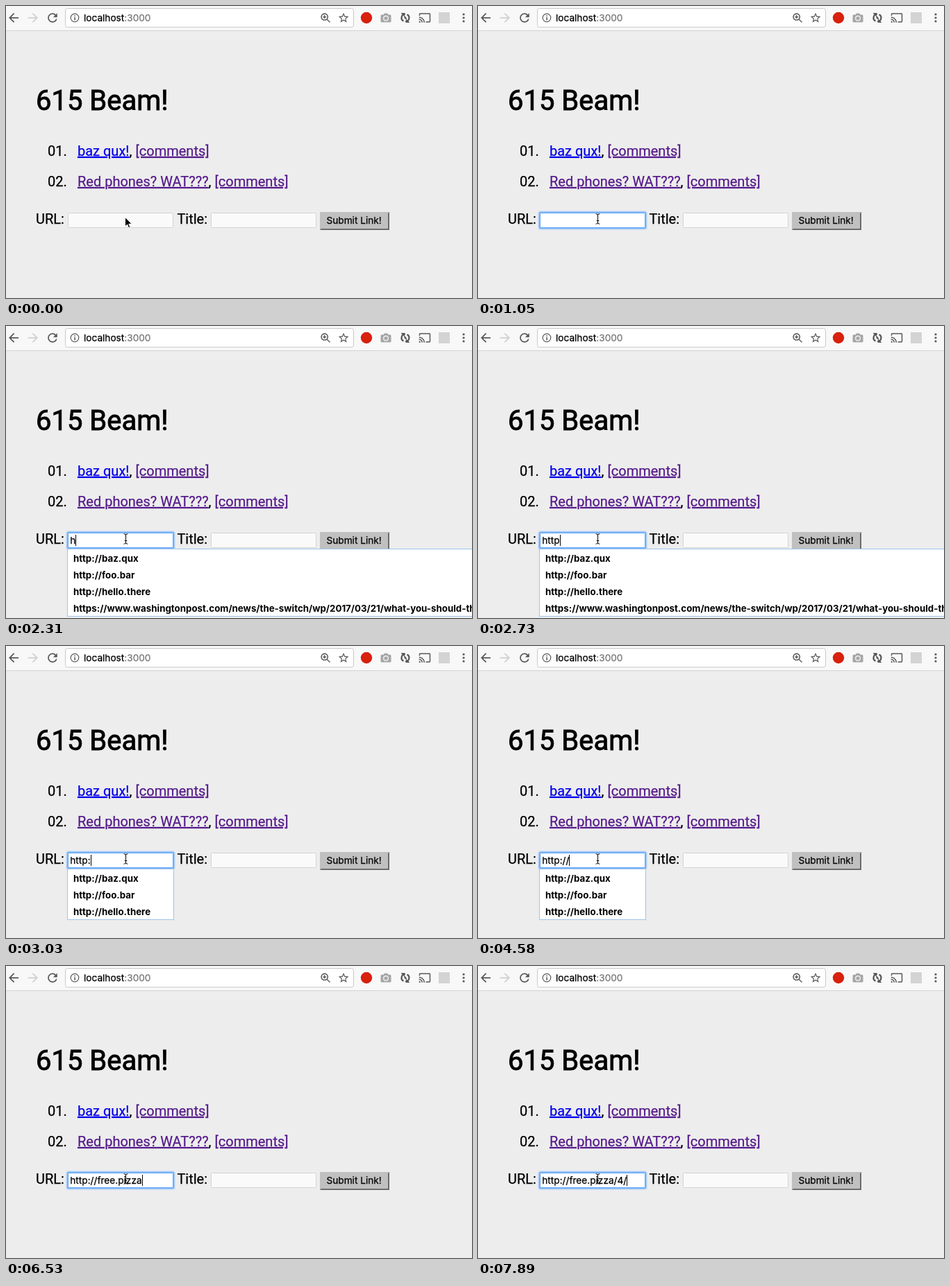
These frames come from a looping animation (671 px wide and 421 px high, 8 s). An HTML page:

```html
<!DOCTYPE html>
<html lang="en">
<head>
<meta charset="utf-8">
<title>Link form</title>
<style>
  html, body { margin: 0; width: 100%; height: 100%; overflow: hidden; background: #ededed; }
  svg { display: block; width: 671px; height: 421px; }
  text { font-family: Roboto, sans-serif; font-size: 20px; fill: #000; stroke: #000; stroke-width: .25px; }
  .ui { font-family: Inter, sans-serif; font-size: 13.65px; font-feature-settings: "calt" 0; }
  .option { font-family: Inter, sans-serif; font-size: 13.3px; font-weight: 700; font-feature-settings: "calt" 0; stroke: none; }
  .title { font-size: 40px; stroke-width: .9px; }
  .link { text-decoration: underline; fill: #551a8b; stroke: #551a8b; }
  .fresh { fill: #0000ee; stroke: #0000ee; }
  .dim { fill: #777; stroke: #777; }
  .icon { fill: #5a5a5a; }
  .line { fill: none; stroke: #5a5a5a; stroke-width: 1.6; }
  .field { fill: #fafafa; stroke: #d3d3d3; }
</style>
</head>
<body>
<svg viewBox="0 0 671 421" xmlns="http://www.w3.org/2000/svg">
  <rect width="671" height="421" fill="#ededed"/>

  <!-- toolbar -->
  <rect width="671" height="35" fill="#f8f8f8"/>
  <rect y="35" width="671" height="1" fill="#d4d4d4"/>
  <defs>
    <path id="arrow" d="M20 11H7.83l5.59-5.59L12 4l-8 8 8 8 1.41-1.41L7.83 13H20z"/>
  </defs>
  <use href="#arrow" class="icon" transform="translate(.5 6.5) scale(.875)"/>
  <use href="#arrow" fill="#d0d0d0" transform="translate(49.5 6.5) scale(-.875 .875)"/>
  <path class="icon" transform="translate(56.8 6.8) scale(.85)" d="M17.65 6.35C16.2 4.9 14.21 4 12 4c-4.42 0-7.99 3.58-7.99 8s3.57 8 7.99 8c3.73 0 6.84-2.55 7.73-6h-2.08c-.82 2.33-3.04 4-5.65 4-3.31 0-6-2.69-6-6s2.69-6 6-6c1.66 0 3.14.69 4.22 1.78L13 11h7V4z"/>
  <rect x="85.5" y="3.5" width="415" height="27" rx="3" fill="#fff" stroke="#c9c9c9"/>
  <circle class="line" cx="99" cy="17" r="5.8" style="stroke-width:1.2"/>
  <path class="icon" d="M98.3 13.5h1.5v1.5h-1.5zM98.3 16h1.5v4.5h-1.5z"/>
  <text class="ui" x="112" y="22">localhost<tspan class="dim">:3000</tspan></text>
  <circle class="line" cx="458.7" cy="15.7" r="4.6"/>
  <path class="line" d="M462.2 19.2l4.3 4.3M456.3 15.7h4.8M458.7 13.3v4.8" style="stroke-width:1.4"/>
  <path class="icon" transform="translate(477.3 8.3) scale(.73)" d="M22 9.24l-7.19-.62L12 2 9.19 8.63 2 9.24l5.46 4.73L5.82 21 12 17.27 18.18 21l-1.63-7.03zM12 15.4l-3.76 2.27 1-4.28-3.32-2.88 4.38-.38L12 6.1l1.71 4.04 4.38.38-3.32 2.88 1 4.28z"/>
  <circle cx="519" cy="17" r="8.2" fill="#d8200d"/>
  <g fill="#a6a6a6">
    <path d="M543.5 12.5l1.5-2h4l1.5 2h2.5q1.5 0 1.5 1.5v8q0 1.5-1.5 1.5h-12q-1.5 0-1.5-1.5v-8q0-1.5 1.5-1.5z"/>
    <circle cx="547" cy="17.7" r="3.9" fill="#f8f8f8"/>
    <circle cx="547" cy="17.7" r="2.6"/>
  </g>
  <path class="line" d="M572.5 21.8A5.4 5.4 0 0 1 575 11.6M577.5 12.2A5.4 5.4 0 0 1 575 22.4M573.8 15.2l2.4 3.6" style="stroke-width:2.3"/>
  <path class="icon" d="M568.5 10h5.5v5.5zM581.5 24h-5.5v-5.5z"/>
  <path class="icon" transform="translate(594 8) scale(.75)" d="M21 3H3c-1.1 0-2 .9-2 2v3h2V5h18v14h-7v2h7c1.1 0 2-.9 2-2V5c0-1.1-.9-2-2-2zM1 18v3h3c0-1.66-1.34-3-3-3zm0-4v2c2.76 0 5 2.24 5 5h2c0-3.87-3.13-7-7-7zm0-4v2c4.97 0 9 4.03 9 9h2c0-6.08-4.93-11-11-11z"/>
  <rect x="623" y="9" width="16" height="16" fill="#d3d3d3"/>
  <g class="icon">
    <circle cx="659" cy="12" r="1.6"/><circle cx="659" cy="17" r="1.6"/><circle cx="659" cy="22" r="1.6"/>
  </g>

  <!-- page -->
  <text class="title" x="43" y="150">615 Beam!</text>
  <text x="60" y="216">01.</text>
  <text class="link fresh" x="103" y="216">baz qux!</text>
  <text x="177.5" y="216">,</text>
  <text class="link" x="186.5" y="216">[comments]</text>
  <text x="60" y="260">02.</text>
  <text class="link" x="103" y="260">Red phones? WAT???</text>
  <text x="291.5" y="260">,</text>
  <text class="link" x="300.5" y="260">[comments]</text>
  <text x="43" y="314">URL:</text>
  <text x="246.4" y="314">Title:</text>
  <rect class="field" x="89.5" y="298.5" width="151" height="21" rx="1"/>
  <rect class="field" x="295.5" y="298.5" width="151" height="21" rx="1"/>
  <rect x="452" y="297" width="100" height="26" fill="#c0c0c0"/>
  <path d="M552 297v26H452l2-2h96v-22z" fill="#6c6c6c"/>
  <text class="ui" x="461.5" y="314">Submit Link!</text>

  <!-- focused field: glow, then white inside -->
  <g id="focus">
    <rect x="86" y="295" width="158" height="28" rx="4" fill="#d3e2f5"/>
    <rect x="87" y="296" width="156" height="26" rx="3.5" fill="#a6ccf8"/>
    <rect x="88" y="297" width="154" height="24" rx="2.5" fill="#7ab4f8"/>
    <rect x="89" y="298" width="152" height="22" rx="1" fill="#69a8f2"/>
    <rect x="90" y="299" width="150" height="20" fill="#fff"/>
    <text id="typed" class="ui" x="92.3" y="314"></text>
    <rect id="caret" y="301" width="1" height="16"/>
  </g>

  <!-- dropdown -->
  <g id="menu">
    <rect id="panel" x="88.5" y="321.5" fill="#fff" stroke="#9cc4ea"/>
    <g id="options"></g>
  </g>

  <path id="pointer" transform="translate(171.5 304.5)" d="M0 0V13.5l3.1-2.9 2.1 4.9 2.2-.9-2.1-4.8h4.3z" stroke="#fff" stroke-width="1"/>
  <path id="beam" d="M169.5 299.8q2.6 0 3 1.6q.4-1.6 3-1.6M172.5 301.4v11.2M169.5 314.2q2.6 0 3-1.6q.4 1.6 3 1.6M170.7 309.5h3.6" fill="none" stroke="#111" stroke-width="1.1"/>
</svg>
<script>
const LOOP = 8000, FOCUS = 540, BEAM = 630, MENU = 2310;
const message = "http://free.pizza/4/";
const keys = [2250, 2550, 2640, 2730, 3030, 3330, 3570, 4700, 4870, 5230,
              5410, 5590, 5820, 5880, 6060, 6180, 6530, 6890, 7300, 7890];
const blinks = [1050, 1590, 2070, 4050, 4580, 7780];
const urls = [
  "http://baz.qux", "http://foo.bar", "http://hello.there",
  "https://www.washingtonpost.com/news/the-switch/wp/2017/03/21/what-you-should-think-about/"
];

const el = id => document.getElementById(id);
const show = (id, on) => el(id).setAttribute("visibility", on ? "visible" : "hidden");

const rows = urls.map(url => {
  const row = document.createElementNS("http://www.w3.org/2000/svg", "text");
  row.setAttribute("class", "option");
  row.setAttribute("x", 97);
  row.textContent = url;
  el("options").append(row);
  return row;
});

function drawMenu(text, open) {
  const hits = open ? rows.filter(row => row.textContent.startsWith(text)) : [];
  rows.forEach(row => row.setAttribute("display", hits.includes(row) ? "inline" : "none"));
  hits.forEach((row, i) => row.setAttribute("y", 339.5 + 24 * i));
  el("panel").setAttribute("width", hits.includes(rows[3]) ? 640 : 153);
  el("panel").setAttribute("height", 24 * hits.length + 1);
  show("menu", hits.length > 0);
}

function draw(t) {
  const count = keys.filter(k => k <= t).length;
  const last = count ? keys[count - 1] : FOCUS;
  const flips = blinks.filter(b => b > last && b <= t).length;
  const text = message.slice(0, count);
  const typed = el("typed");

  typed.textContent = text;
  const width = count ? typed.getComputedTextLength() : 0;
  el("caret").setAttribute("x", Math.round(92.3 + width));
  show("focus", t >= FOCUS);
  show("caret", t >= FOCUS && flips % 2 === 0);
  show("pointer", t < BEAM);
  show("beam", t >= BEAM);
  drawMenu(text, t >= MENU);
}

const start = performance.now();
function tick() {
  draw((performance.now() - start) % LOOP);
  requestAnimationFrame(tick);
}
tick();
</script>
</body>
</html>
```
